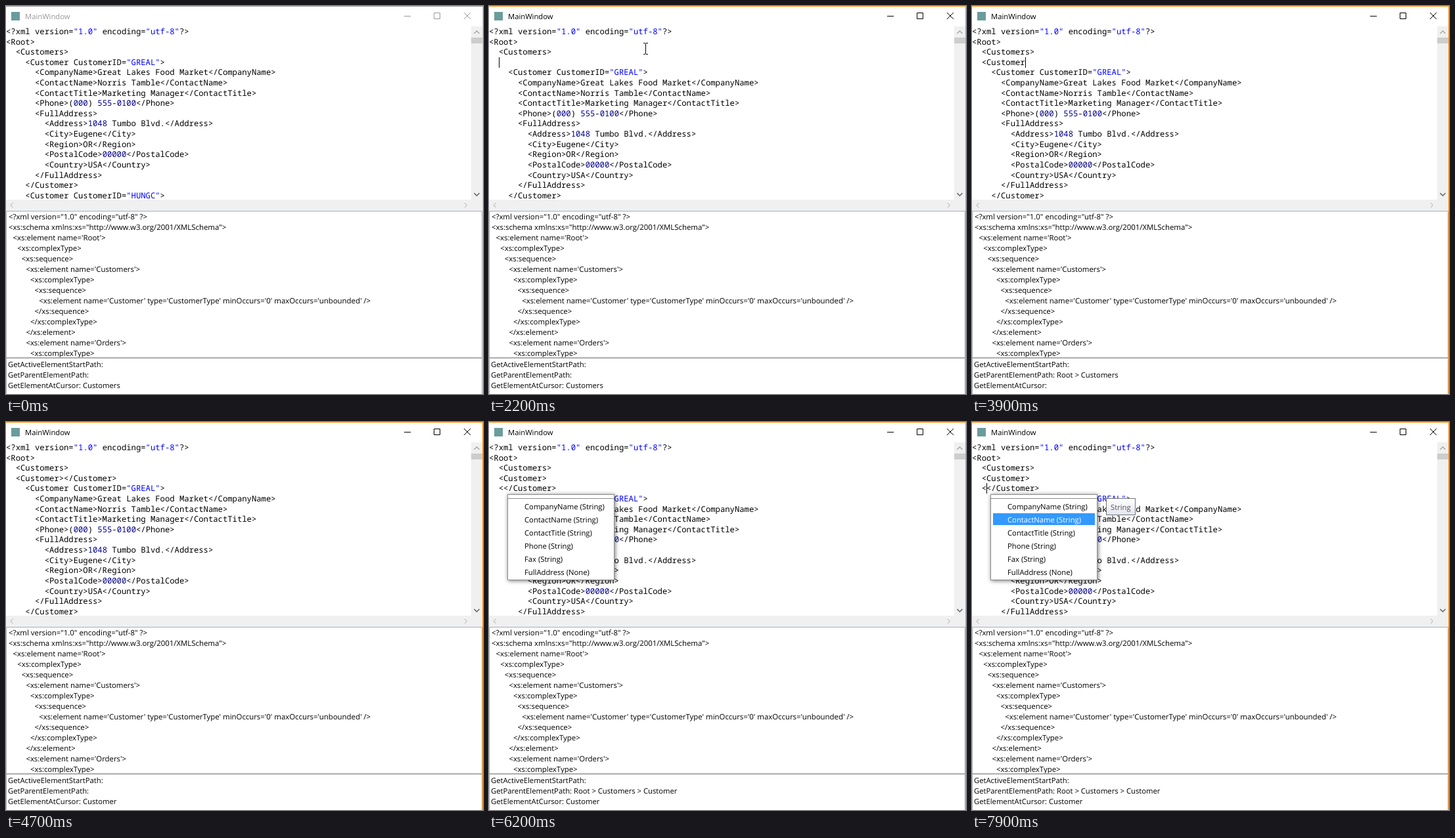
Recreate the animation shown at these times as an HTML page. Size 726 by 591 pixels, loop 8 s.

```html
<!DOCTYPE html>
<html lang="en">
<head>
<meta charset="utf-8">
<title>XML editor</title>
<style>
  html, body { margin: 0; width: 100%; height: 100%; overflow: hidden; background: #fff; }
  svg { display: block; width: 726px; height: 591px; }
  text { white-space: pre; font: 11.25px "Open Sans", "Noto Sans", sans-serif; text-rendering: geometricPrecision; }
  #schema text { font-size: 11.4px; }
  #code text { font: 12.22px "Noto Sans Mono", "DejaVu Sans Mono", monospace; }
  .shadow { filter: drop-shadow(1px 1px 3px rgba(0, 0, 0, .55)); }
</style>
</head>
<body>
<svg viewBox="0 0 726 591">
  <defs>
    <clipPath id="editor"><rect y="31" width="708" height="264"/></clipPath>
    <clipPath id="schemaBox"><rect y="313" width="724" height="222"/></clipPath>
    <linearGradient id="tipFill" x2="0" y2="1">
      <stop stop-color="#fff"/><stop offset="1" stop-color="#e4e5f0"/>
    </linearGradient>
  </defs>
  <rect width="726" height="591" fill="#fff"/>

  <rect x="8" y="9" width="13" height="13" fill="#6a9c9c"/>
  <g id="chrome"></g>

  <g id="code" clip-path="url(#editor)"></g>

  <g fill="none">
    <path d="M708 31h17v281H0V295H708z" fill="#f0f0f0"/>
    <rect x="708" y="48" width="17" height="9" fill="#cdcdcd"/>
    <path d="M712.5 42l4-4 4 4" stroke="#a3a3a3" stroke-width="1.3"/>
    <path d="M712.5 285l4 4 4-4" stroke="#606060" stroke-width="1.5"/>
    <path d="M10.5 300l-3.5 3.5 3.5 3.5M698 300l3.5 3.5-3.5 3.5" stroke="#c6c6c6" stroke-width="1.2"/>
  </g>

  <g id="schema" clip-path="url(#schemaBox)"></g>
  <g id="log"></g>
  <path d="M.5 591V312.5H724.5V591M0 535.5H725M0 536.5H725" fill="none" stroke="#abadb3"/>

  <g id="overlay"></g>
</svg>
<script>
const LOOP = 8000, CHAR = 7.332, ROW = 15.61, TOP = 31;
const $ = id => document.getElementById(id);
const escapeXml = s => s.replace(/&/g, '&amp;').replace(/</g, '&lt;').replace(/>/g, '&gt;');
const label = (x, y, s, fill = '#000') => `<text x="${x}" y="${y}" fill="${fill}">${escapeXml(s)}</text>`;
const rect = (x, y, w, h, attrs) => `<rect x="${x}" y="${y}" width="${w}" height="${h}" ${attrs}/>`;
const rowTop = i => Math.round(TOP + ROW * i);

const head = ['<?xml version="1.0" encoding="utf-8"?>', '<Root>', '  <Customers>'];
const tail = `  <Customer CustomerID="GREAL">
    <CompanyName>Great Lakes Food Market</CompanyName>
    <ContactName>Norris Tamble</ContactName>
    <ContactTitle>Marketing Manager</ContactTitle>
    <Phone>(000) 555-0100</Phone>
    <FullAddress>
      <Address>1048 Tumbo Blvd.</Address>
      <City>Eugene</City>
      <Region>OR</Region>
      <PostalCode>00000</PostalCode>
      <Country>USA</Country>
    </FullAddress>
  </Customer>
  <Customer CustomerID="HUNGC">`.split('\n').map(s => '  ' + s);

const schema = `<?xml version="1.0" encoding="utf-8" ?>
<xs:schema xmlns:xs="http://www.w3.org/2001/XMLSchema">
 <xs:element name='Root'>
  <xs:complexType>
   <xs:sequence>
    <xs:element name='Customers'>
     <xs:complexType>
      <xs:sequence>
       <xs:element name='Customer' type='CustomerType' minOccurs='0' maxOccurs='unbounded' />
      </xs:sequence>
     </xs:complexType>
    </xs:element>
    <xs:element name='Orders'>
     <xs:complexType>`.split('\n');

const customerMenu = { y: 94, items: ['Customer (None)'] };
const fieldMenu = {
  y: 110,
  items: ['CompanyName (String)', 'ContactName (String)', 'ContactTitle (String)',
    'Phone (String)', 'Fax (String)', 'FullAddress (None)']
};

// Each step changes part of the state; caret is [column, row].
const steps = [
  [0, { active: false, typed: [], parent: '', element: 'Customers',
        mouse: null, caret: null, menu: null, picked: -1, tip: null }],
  [100, { mouse: [478.5, 47] }],
  [200, { mouse: [276.5, 65] }],
  [500, { mouse: [258.5, 65] }],
  [600, { mouse: [243.5, 65] }],
  [700, { mouse: [238.5, 65] }],
  [900, { active: true, caret: [13, 2] }],
  [1400, { caret: null }],
  [1900, { caret: [13, 2] }],
  [2200, { typed: [''], caret: [2, 3] }],
  [2700, { caret: null, mouse: null }],
  [3000, { typed: ['  <'], caret: [3, 3], menu: customerMenu, parent: 'Root > Customers', element: '' }],
  [3500, { caret: null }],
  [3700, { caret: [3, 3], picked: 0 }],
  [3800, { tip: 'None' }],
  [3900, { typed: ['  <Customer'], caret: [11, 3], menu: null, picked: -1, tip: null }],
  [4200, { typed: ['  <Customer></Customer>'], caret: [12, 3], parent: '', element: 'Customer' }],
  [4700, { caret: null }],
  [5100, { typed: ['  <Customer>', '  </Customer>'], caret: [2, 4] }],
  [5500, { caret: null }],
  [6200, { typed: ['  <Customer>', '  <</Customer>'], menu: fieldMenu, parent: 'Root > Customers > Customer' }],
  [6700, { caret: [3, 4] }],
  [7200, { caret: null }],
  [7700, { caret: [3, 4], picked: 0 }],
  [7800, { tip: 'String' }],
  [7900, { picked: 1 }]
];

function colorize(line) {
  return escapeXml(line).replace(/"[^"]*"|\b\d[\d.]*/g, token =>
    `<tspan fill="${token[0] === '"' ? '#00f' : '#00008b'}">${token}</tspan>`);
}

function drawChrome(active) {
  const ink = active ? '#000' : '#999';
  const [top, side] = active ? ['#ff981c', '#ff981c'] : ['#999', '#d4d4d4'];
  return rect(725, 0, 1, 591, `fill="${side}"`) + rect(0, 0, 726, 1, `fill="${top}"`) +
    label(29, 20, 'MainWindow', ink) +
    `<path d="M606 15.5h10M651.5 10.5h9v9h-9zM697 10l10 10M707 10l-10 10" fill="none" stroke="${ink}"/>`;
}

function drawMenu({ y, items }, picked, tip) {
  const height = 20 * items.length + 10;
  let out = `<g class="shadow">${rect(28.5, y + .5, 162, height, 'fill="#fff" stroke="#8c8c8c"')}</g>` +
    `<path d="M29 ${y + 6.5}H190" stroke="#8c8c8c"/>`;
  items.forEach((item, i) => {
    const mid = y + 19 + 20 * i, on = i === picked;
    if (on) out += rect(32, mid - 10, 155, 18, 'fill="#39f"');
    out += label(54, mid + 4, item, on ? '#fff' : '#000');
  });
  if (tip) {
    const width = tip === 'None' ? 42 : 44;
    out += rect(204.5, y + 6.5, width, 25, 'fill="url(#tipFill)" stroke="#767676"') +
      label(211, y + 24, tip, '#575757');
  }
  return out;
}

function drawOverlay({ caret, mouse, menu, picked, tip }) {
  let out = '';
  if (caret) out += rect(Math.round(caret[0] * CHAR), rowTop(caret[1]), 1, 16, 'fill="#000"');
  if (menu) out += drawMenu(menu, picked, tip);
  if (mouse) {
    out += `<path transform="translate(${mouse})" fill="none" stroke="#000"
      d="M-3.5 -8.5h3M.5 -8.5h3M0 -8V8M-3.5 8.5h3M.5 8.5h3"/>`;
  }
  return out;
}

function render(state) {
  const lines = [...head, ...state.typed, ...tail].slice(0, 17);
  $('chrome').innerHTML = drawChrome(state.active);
  $('code').innerHTML = lines.map((line, i) =>
    `<text x="0" y="${rowTop(i) + 12}">${colorize(line)}</text>`).join('');
  $('log').innerHTML = ['GetActiveElementStartPath:', 'GetParentElementPath: ' + state.parent,
    'GetElementAtCursor: ' + state.element].map((s, i) => label(3, 550 + 16 * i, s)).join('');
  $('overlay').innerHTML = drawOverlay(state);
}

$('schema').innerHTML = schema.map((line, i) => {
  const depth = line.search(/\S/);
  return label(4 + 6.6 * depth, 325 + 16 * i, line.trim());
}).join('');

let shown = 0;
const start = performance.now();
function tick() {
  const t = (performance.now() - start) % LOOP;
  const past = steps.filter(([at]) => at <= t);
  if (past.length !== shown) {
    shown = past.length;
    render(Object.assign({}, ...past.map(([, change]) => change)));
  }
  requestAnimationFrame(tick);
}
tick();
</script>
</body>
</html>
```
